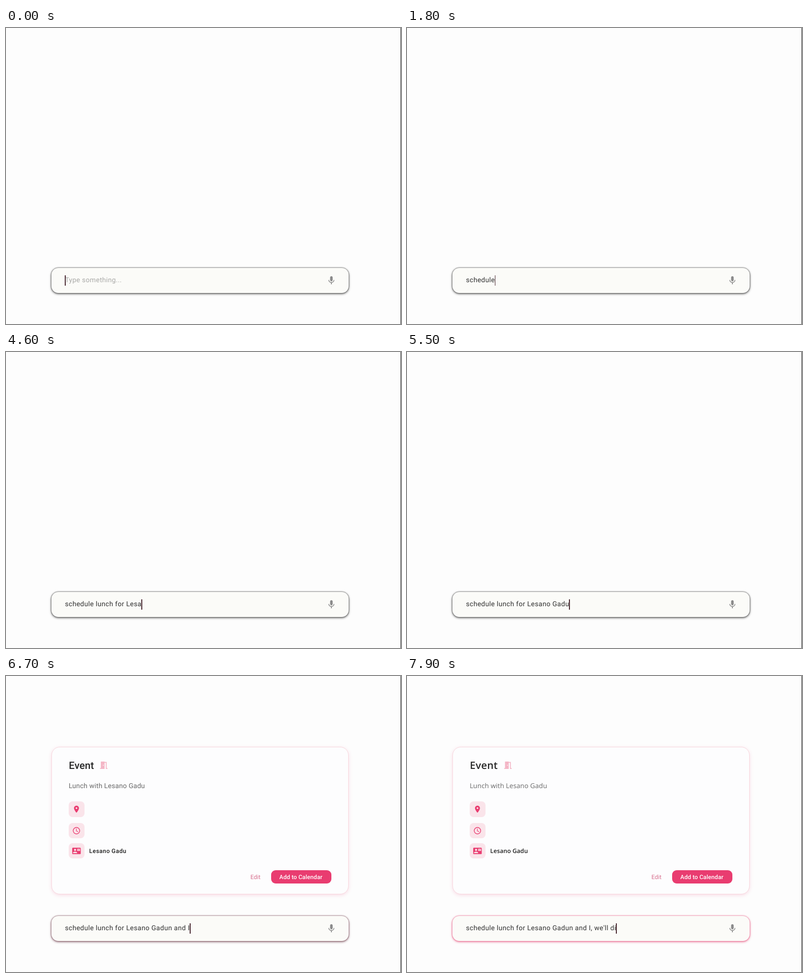
An HTML page that plays this animation: 800x602 px, repeating every 8000 ms.

```html
<!DOCTYPE html>
<html lang="en">
<head>
<meta charset="utf-8">
<title>Quick event input</title>
<style>
  :root { --pink: #e93c70; }
  html, body { margin: 0; width: 100%; height: 100%; overflow: hidden; background: #fdfdfd; }
  #stage {
    position: absolute; inset: 0 auto auto 0; width: 800px; height: 602px; overflow: hidden;
    background: #fdfdfd; font-family: Roboto, sans-serif; text-rendering: geometricPrecision;
  }
  #stage > *, #card > * { position: absolute; box-sizing: border-box; }
  .edge { left: 799px; top: 0; width: 1px; height: 602px; background: #333; }

  #bar { left: 92px; top: 488px; width: 601.5px; height: 51px; border-radius: 14px; background: #fbfbf8; }
  .line { left: 119.5px; top: 503px; height: 21px; line-height: 20.4px; white-space: pre;
    font-size: 13.8px; letter-spacing: .4px; color: #303030; }
  #hint { letter-spacing: .36px; color: #a9a9a7; }
  #caret { position: absolute; top: 0; width: 1.5px; height: 21px; margin-left: -.3px; background: #4a2a32; }

  #card { left: 0; top: 0; width: 800px; height: 460px; }
  .panel { left: 92px; top: 143.5px; width: 602px; height: 300.5px; border-radius: 17px;
    border: 1.4px solid #f8d6dd; background: #fdfdfe;
    box-shadow: 0 2px 7px rgba(240, 150, 180, .32); }
  .chip { left: 127px; width: 31.5px; height: 31.5px; border-radius: 8px; background: #fae4ea; }
  .button { left: 536.5px; top: 394.5px; width: 122px; height: 27.5px; border-radius: 9px; background: var(--pink); }
  svg { left: 0; top: 0; }
  #title { font-size: 20.6px; font-weight: 500; fill: #262626; }
  #about { font-size: 13.8px; letter-spacing: .18px; fill: #686868; }
  #guest { font-size: 12.04px; font-weight: 500; letter-spacing: .43px; fill: #1c1c1c; }
  .action { font-size: 12.04px; font-weight: 500; letter-spacing: .05px; }
  #title.alt, #about.alt, #guest.alt { font-family: "Open Sans", "Noto Sans", sans-serif; }
  #title.alt { font-weight: 600; letter-spacing: .2px; }
  #about.alt { font-size: 13.5px; letter-spacing: .1px; }
  #guest.alt { font-weight: 600; letter-spacing: .1px; }
</style>
</head>
<body>
<div id="stage">
  <div id="card">
    <div class="panel"></div>
    <div class="chip" style="top:255px"></div>
    <div class="chip" style="top:298.8px"></div>
    <div class="chip" style="top:340px;height:31px"></div>
    <div class="button"></div>
    <svg width="800" height="460" fill="#e93c70">
      <text id="title" x="127.3" y="188.7">Event</text>
      <path id="door" fill="#f4b6c6" d="M14 6v15H3v-2h2V3h9v1h5v15h2v2h-4V6h-3zm-4 5v2h2v-2h-2z"/>
      <text id="about" x="127" y="228">Lunch with Lesano Gadu</text>
      <path transform="translate(134.1 262.2) scale(.72)" d="M12 2C8.13 2 5 5.13 5 9c0 5.25 7 13 7 13s7-7.75 7-13c0-3.87-3.13-7-7-7zm0 9.5a2.5 2.5 0 1 1 0-5 2.5 2.5 0 0 1 0 5z"/>
      <g fill="none" stroke="#e93c70" stroke-width="1.4">
        <circle cx="142.7" cy="314.6" r="6.6"/>
        <path stroke-width="1.1" d="M142.5 310.4v4.6l3.4 2"/>
      </g>
      <path transform="translate(134.1 347.2) scale(.72)" d="M21 8V7l-3 2-3-2v1l3 2 3-2zm1-5H2C.9 3 0 3.9 0 5v14c0 1.1.9 2 2 2h20c1.1 0 2-.9 2-2V5c0-1.1-.9-2-2-2zM8 6a3 3 0 1 1 0 6 3 3 0 0 1 0-6zm6 12H2v-1c0-2 4-3.1 6-3.1s6 1.1 6 3.1v1zm8-6h-8V6h8v6z"/>
      <text id="guest" x="168.6" y="360.2">Lesano Gadu</text>
      <text class="action" x="495" y="412.7" fill="#d8708f" style="font-weight:400">Edit</text>
      <text class="action" x="553.6" y="412.7" fill="#fff">Add to Calendar</text>
    </svg>
  </div>

  <div id="bar"></div>
  <div id="hint" class="line">Type something...</div>
  <div class="line"><span id="typed"></span><i id="caret"></i></div>
  <svg width="800" height="602">
    <path fill="#8a8a8a" transform="translate(648.7 503.1) scale(.86)" d="M12 14c1.66 0 3-1.34 3-3V5c0-1.66-1.34-3-3-3S9 3.34 9 5v6c0 1.66 1.34 3 3 3zm5.3-3c0 3-2.54 5.1-5.3 5.1S6.7 14 6.7 11H5c0 3.41 2.72 6.23 6 6.72V21h2v-3.28c3.28-.48 6-3.3 6-6.72h-1.7z"/>
  </svg>
  <div class="edge"></div>
</div>

<script>
  const LOOP = 8000;
  const CARET_ON = 500;
  const message = "schedule lunch for Lesano Gadun and I, we'll di";
  // Key presses in tenths of a second, one per letter.
  const keys = [
    5, 8, 11, 12, 14, 15, 16, 17, 19,
    20, 23, 25, 33, 34, 35, 36, 37, 38, 40,
    41, 44, 45, 46, 47, 48, 50, 51, 52, 53, 55, 56, 57,
    58, 59, 60, 61, 63, 69, 70,
    71, 72, 74, 75, 76, 77, 78, 79
  ].map(k => k * 100);

  const el = id => document.getElementById(id);
  const [card, bar, hint, typed, caret, title, about, guest, door] =
    ["card", "bar", "hint", "typed", "caret", "title", "about", "guest", "door"].map(el);

  const ramp = (t, from, to) => Math.min(1, Math.max(0, (t - from) / (to - from)));
  const mix = (a, b, p) => a.map((v, i) => v + (b[i] - v) * p);

  function draw(t) {
    const count = keys.filter(k => k <= t).length;
    typed.textContent = message.slice(0, count);
    hint.style.visibility = count ? "hidden" : "visible";

    const lit = count ? t - keys[count - 1] < CARET_ON : t < 100;
    caret.style.visibility = lit ? "visible" : "hidden";

    const rgb = mix([0, 0, 0], [226, 38, 92], ramp(t, 6500, 7100)).map(Math.round).join();
    bar.style.boxShadow =
      `0 0 2px .5px rgba(${rgb},.5), 0 1.5px 4px .5px rgba(${rgb},.55)`;

    card.style.opacity = ramp(t, 6500, 6650);
    const swapped = t >= 6900;
    title.classList.toggle("alt", swapped);
    about.classList.toggle("alt", swapped);
    guest.classList.toggle("alt", t >= 7100);
    door.setAttribute("transform", `translate(${swapped ? 194.3 : 187.9} 171.4) scale(.84)`);
  }

  const start = performance.now();
  function tick() {
    draw((performance.now() - start) % LOOP);
    requestAnimationFrame(tick);
  }
  tick();
</script>
</body>
</html>
```
